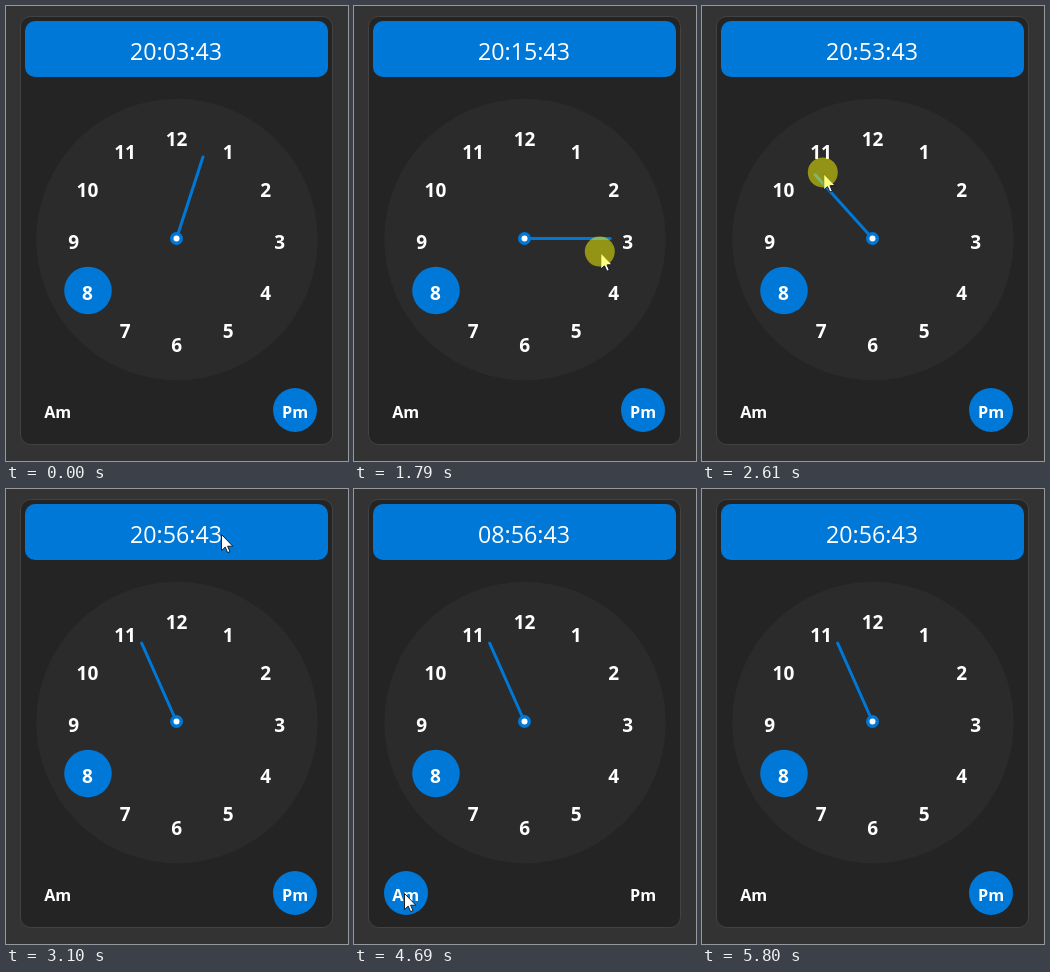
Recreate the animation shown at these times as an HTML page. Size 342 by 455 pixels, loop 6.53 s.

```html
<!DOCTYPE html>
<html lang="en">
<head>
<meta charset="utf-8">
<title>Time picker</title>
<style>
  html, body { margin: 0; width: 100%; height: 100%; overflow: hidden; background: #333; }
  svg { display: block; width: 342px; height: 455px; }
  text { fill: #fff; text-anchor: middle; font-family: "Open Sans", "Noto Sans", sans-serif; }
  #time { font-size: 23.2px; }
  #hours { font-size: 19px; font-weight: 700; }
  .half { font-size: 16.2px; font-weight: 700; }
  .blue { fill: #0078d7; }
</style>
</head>
<body>
<svg viewBox="0 0 342 455">
  <rect x="14.5" y="10.5" width="312" height="428" rx="10" fill="#242424" stroke="#434343"/>
  <rect class="blue" x="19" y="15" width="303" height="56" rx="10"/>
  <text id="time" x="170" y="54"></text>
  <circle cx="171" cy="233.5" r="140.7" fill="#2b2b2b"/>
  <circle class="blue" cx="82" cy="284.5" r="23.8"/>
  <g id="hours"></g>
  <line id="hand" x1="170.5" y1="232.5" x2="170.5" y2="146.8" stroke="#0078d7" stroke-width="3" stroke-linecap="round"/>
  <circle class="blue" cx="170.5" cy="232.5" r="6.5"/>
  <circle cx="170.5" cy="232.5" r="3" fill="#fff"/>
  <circle id="mark" class="blue" cy="404" r="22"/>
  <text class="half" x="51.7" y="411.5">Am</text>
  <text class="half" x="289" y="411.5">Pm</text>
  <g id="cursor">
    <path d="M.5.5V16.6L4.2 13.1 6.6 18.6 9 17.6 6.6 12.2H11.8Z" fill="#fff" stroke="#111" stroke-width=".9"/>
    <circle id="press" cx="-.5" cy="-1" r="15" fill="#ff0" fill-opacity=".49"/>
  </g>
</svg>
<script>
const LOOP = 6530;
const CX = 170.5, CY = 232.5;
const AM_ON = 4600, AM_OFF = 5350, CLICK = 70;

// the hand is dragged twice, from one minute to another
const drags = [
  { start: 350, end: 620, from: 3, to: 9 },
  { start: 1650, end: 2670, from: 9, to: 56 }
];
const grab = drags[0].start, release = drags[1].end;

const $ = id => document.getElementById(id);
const within = (t, a, b) => t >= a && t < b;
const mix = (a, b, p) => a + (b - a) * p;
const clamp = p => Math.min(1, Math.max(0, p));

function polar(angle, r, cx = CX, cy = CY) {
  const a = angle * Math.PI / 180;
  return [cx + r * Math.sin(a), cy - r * Math.cos(a)];
}

const dragAt = t => t < drags[1].start ? drags[0] : drags[1];
const progress = (d, t) => clamp((t - d.start) / (d.end - d.start));

function minuteAt(t) {
  const d = dragAt(t);
  return mix(d.from, d.to, progress(d, t));
}

// while dragging, the pointer leads the hand and cuts inside its circle
function grip(t) {
  const d = dragAt(t);
  const bend = (d.to - d.from) * Math.sin(Math.PI * progress(d, t));
  return polar(minuteAt(t) * 6 + bend * 0.38, 85 - bend * 0.4);
}

// arrival, departure, x, y of the pointer
const stops = [
  [70, 70, 334, 446],
  [grab, grab, ...grip(grab)],
  [release, release, ...grip(release)],
  [3090, 3640, 215, 45],
  [4060, 4060, 119, 274],
  [4500, 4750, 50, 404],
  [5220, 5720, 274, 402],
  [5790, 5790, 297, 450]
];

function pointer(t) {
  if (within(t, grab, release)) return grip(t);
  const next = stops.findIndex(s => s[0] > t);
  if (next < 1) return stops[0].slice(2);
  const [, leave, x0, y0] = stops[next - 1];
  const [arrive, , x1, y1] = stops[next];
  const p = clamp((t - leave) / (arrive - leave));
  return [mix(x0, x1, p), mix(y0, y1, p)];
}

function pressed(t) {
  return drags.some(d => within(t, d.start, d.end)) ||
    [AM_ON, AM_OFF].some(c => Math.abs(t - c) < CLICK);
}

function draw(now) {
  const t = now % LOOP;
  const minute = Math.floor(minuteAt(t));
  const am = within(t, AM_ON, AM_OFF);
  const [x, y] = pointer(t);

  $("time").textContent = `${am ? "08" : "20"}:${String(minute).padStart(2, "0")}:43`;
  $("hand").setAttribute("transform", `rotate(${minute * 6} ${CX} ${CY})`);
  $("mark").setAttribute("cx", am ? 52 : 289);
  $("cursor").setAttribute("transform", `translate(${x} ${y})`);
  $("cursor").style.display = within(t, 70, 5790) ? "" : "none";
  $("press").style.display = pressed(t) ? "" : "none";
}

for (let h = 1; h <= 12; h++) {
  const [x, y] = polar(h * 30, 103, 170.6, 235.7);
  const label = document.createElementNS("http://www.w3.org/2000/svg", "text");
  label.setAttribute("x", x);
  label.setAttribute("y", y + 7);
  label.textContent = h;
  $("hours").append(label);
}

const begin = performance.now();
function tick() {
  draw(performance.now() - begin);
  requestAnimationFrame(tick);
}
tick();
</script>
</body>
</html>
```
